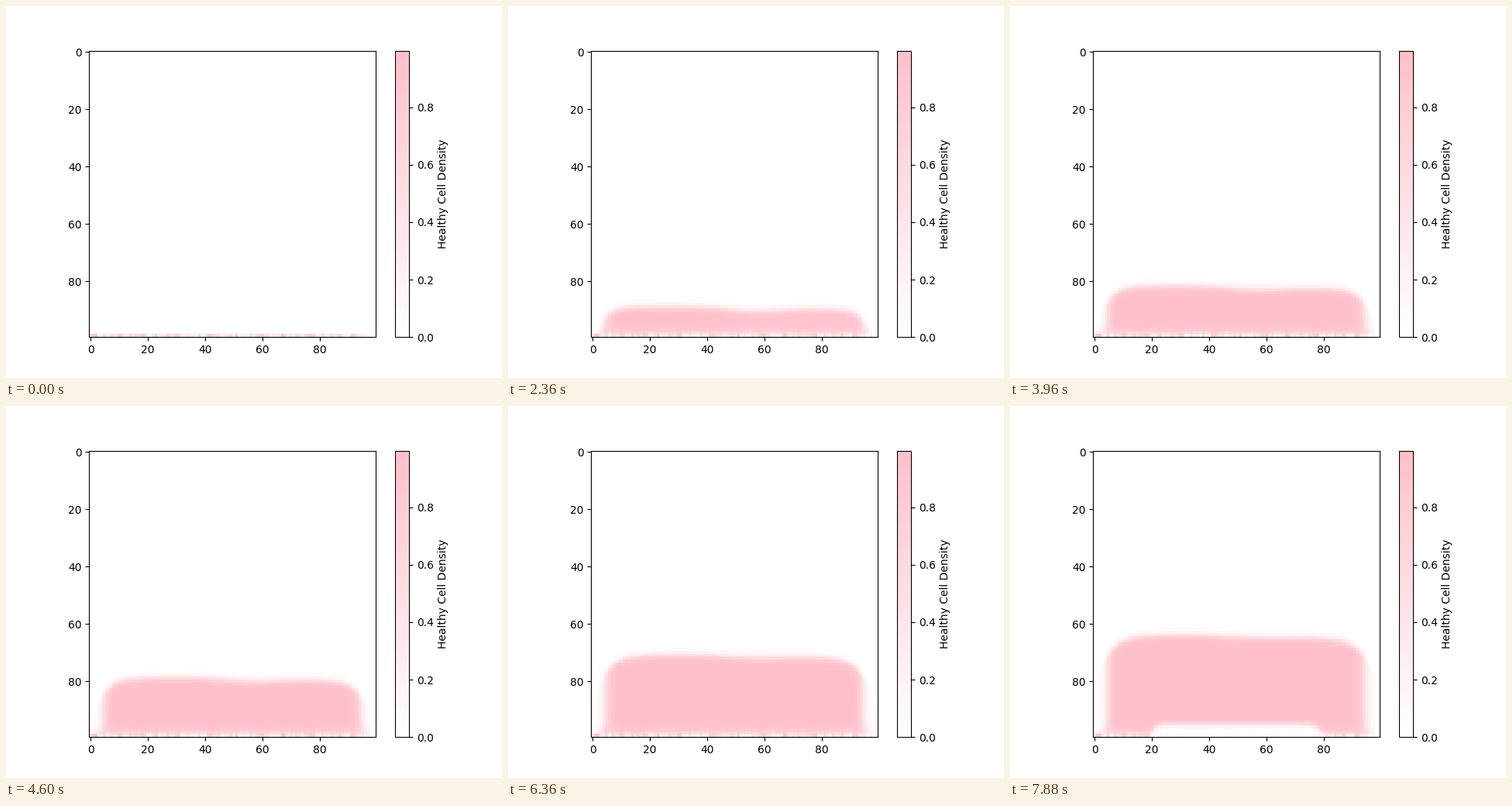
Animation, 640 px wide and 480 px high, one loop 8 s. Source, as a matplotlib script:

```python
import numpy as np
import matplotlib.pyplot as plt
from matplotlib.animation import FuncAnimation
from matplotlib.colors import LinearSegmentedColormap

N = 100
LOOP, INTERVAL = 8000, 40
VMAX = 0.997

# Times (ms) at which the picture advances; it holds still in between
STEPS = np.concatenate([
    [0],
    np.linspace(100, 980, 5),
    [1180, 1360, 1540, 1720, 1880, 2040, 2200],
    np.arange(2360, 6841, 160),
    [6980],
    np.arange(7080, 7881, 160),
])

row, col = np.mgrid[0:N, 0:N].astype(float)
edge = np.minimum(col, N - 1 - col)


def sigmoid(x):
    return 1 / (1 + np.exp(-np.clip(x, -40, 40)))


def seed_row():
    rng = np.random.default_rng(7)
    seeds = rng.uniform(0.12, 0.72, N)
    strong = [1, 10, 11, 14, 18, 19, 23, 30, 31, 41, 42, 51,
              59, 60, 68, 77, 78, 87, 91, 92]
    seeds[strong] = rng.uniform(0.72, 0.9, len(strong))
    seeds[[2, 67]] = VMAX, 0.95
    seeds[-5:] *= 0.7
    return seeds


seeds = seed_row()
right_half = sigmoid((col - 46) / 4)
dip = np.exp(-((col - 57) / 11) ** 2)
depth = N - 2 - row


def tissue(t):
    """Density of healthy cells after t seconds."""
    # Rising front, lower towards the corners and on the right
    corner = 6 + 12 * np.clip((t - 1.18) / 2, 0, 1)
    top = 99.63 - 4.52 * t + corner * np.exp(-edge / (2.9 + 0.24 * t))
    top += 0.85 * right_half + 0.7 * dip * np.exp(-max(t - 3, 0) / 3)
    front = sigmoid((row - top) / 0.7)

    # Lateral limits flare out at the base
    limit = 4.7 - 2.3 * np.exp(-depth / 1.5)
    sides = sigmoid((edge - limit) / 1.0)

    tau = 0.77 + 0.3 * right_half + 0.12 * dip
    growth = 1 - np.exp(-(t / tau) ** 1.5)
    base = 1 - 0.33 * np.exp(-depth / 1.3)
    mottle = 0.25 * (seeds - 0.45) * np.exp(-depth / 0.8)
    return front * sides * growth * (base + mottle)


def decay(t):
    """Fraction of tissue eaten away from below."""
    inset = np.minimum(col - 19.5, 79.5 - col)
    reach = 99.4 - 4.4 * (t - 6.9) + 3.5 * np.exp(-np.maximum(inset, 0) / 1.5)
    return sigmoid((row - reach) / 0.6) * sigmoid(inset / 0.8)


def density(t):
    field = tissue(t) if t > 0 else np.zeros((N, N))
    bottom = seeds.copy()
    if t >= 6.84:
        field *= 1 - decay(t)
        bottom[20:80] *= 0.2 + 0.8 * np.exp(-(t - 6.78) / 0.12)
    field[-1] = bottom
    return np.clip(field, 0, VMAX)


fig, ax = plt.subplots(figsize=(6.4, 4.8), dpi=100)
cmap = LinearSegmentedColormap.from_list("healthy", ["white", "pink"])
image = ax.imshow(density(0), cmap=cmap, vmin=0, vmax=VMAX)
fig.colorbar(image, ax=ax, label="Healthy Cell Density")


def update(i):
    now = (i + 0.5) * INTERVAL
    step = np.searchsorted(STEPS, now, side="right") - 1
    image.set_data(density(STEPS[step] / 1000))
    return [image]


anim = FuncAnimation(fig, update, frames=LOOP // INTERVAL, interval=INTERVAL,
                     repeat=True, repeat_delay=0, cache_frame_data=False)
plt.show()
```
